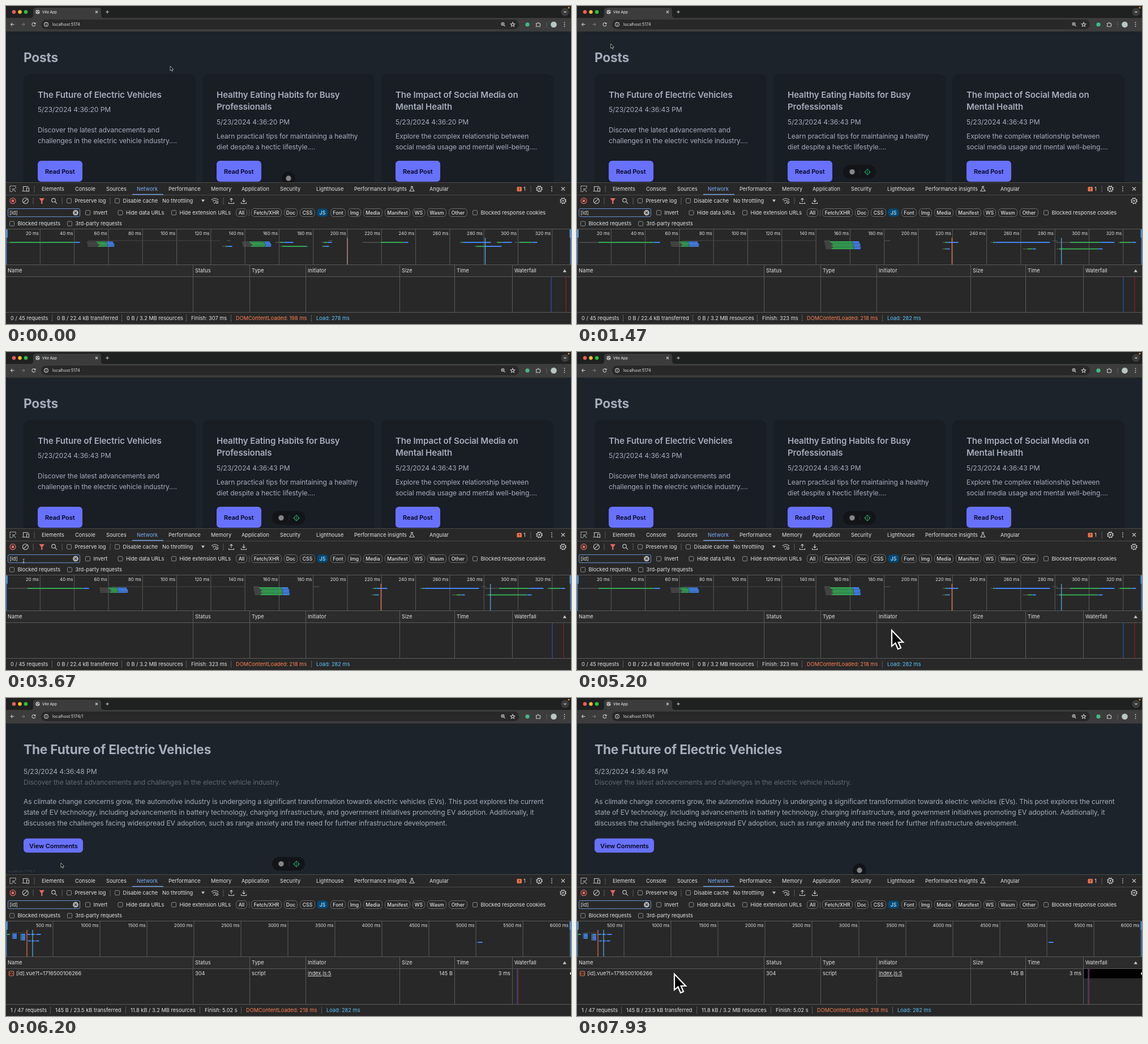
Recreate the animation shown at these times as an HTML page. Size 998x561 px, loop 8 s.

```html
<!DOCTYPE html>
<html lang="en">
<head>
<meta charset="utf-8">
<title>Vite App</title>
<style>
  html, body { margin: 0; width: 100%; height: 100%; overflow: hidden; background: #282828; }
  svg { display: block; width: 100vw; height: 100vh; }
  text { font: 9.2px Inter, "Open Sans", sans-serif; letter-spacing: .003em; fill: #e3e3e3; white-space: pre; }
  .page text { font-size: 12.1px; letter-spacing: -.0072em; fill: #a6adbb; }
  .page .h1 { font-size: 22.7px; font-weight: 700; letter-spacing: -.009em; }
  .page .h2 { font-size: 15.1px; font-weight: 600; letter-spacing: -.008em; }
  .page .btn { font-size: 11px; font-weight: 600; letter-spacing: -.008em; fill: #05061a; }
  .page .dim { fill: #626872; }
  .tick { font-size: 7.8px; text-anchor: end; }
  .chip { font-size: 8.7px; font-weight: 500; text-anchor: middle; }
  .end { text-anchor: end; }
  .line { fill: none; stroke: #c7c7c7; stroke-width: 1.1; }
</style>
</head>
<body>
<svg id="stage" viewBox="0 0 998 561" preserveAspectRatio="none"></svg>
<script>
const LOOP = 8000, RELOAD = 1130, LOADED = 1400, OPENED = 6130;
const GREY = '#5c5c5c', GREEN = '#34a853', BLUE = '#4285f4', EDGE = '#5a5a5a';
const ORANGE = '#f0724a', SKY = '#4db8f0';

const text = (x, y, s, cls = '', fill = '') =>
  `<text x="${x}" y="${y}" class="${cls}"${fill && ` style="fill:${fill}"`}>${s}</text>`;
const rect = (x, y, w, h, fill, rx = 0, extra = '') =>
  `<rect x="${x}" y="${y}" width="${w}" height="${h}" fill="${fill}" rx="${rx}" ${extra}/>`;
const circle = (x, y, r, fill, extra = '') => `<circle cx="${x}" cy="${y}" r="${r}" fill="${fill}" ${extra}/>`;
const icon = (x, y, d, extra = '') => `<path class="line" transform="translate(${x} ${y})" d="${d}" ${extra}/>`;
const vline = (x, y1, y2, c, w = 1) => rect(x - w / 2, y1, w, y2 - y1, c);
const group = (id, body, cls = '') => `<g id="${id}" class="${cls}">${body}</g>`;
const dots = (x, y, c = '#c7c7c7') => [-3.5, 0, 3.5].map(d => circle(x, y + d, .9, c)).join('');
const gear = (x, y) => circle(x, y, 3.9, 'none', 'stroke="#c7c7c7" stroke-width="1.1"') +
  circle(x, y, 5, 'none', 'stroke="#c7c7c7" stroke-width="1.6" stroke-dasharray="2.2 1.73"') +
  circle(x, y, 1.4, '#c7c7c7');
const check = (x, y, label) =>
  rect(x - .5, y - 4, 8, 8, 'none', 1.5, 'stroke="#8a8a8a"') + text(x + 13.5, y + 3.2, label);

function browser() {
  const lights = ['#ff5f57', '#febc2e', '#28c840'];
  return rect(0, 0, 998, 21, '#1f2020') +
    lights.map((c, i) => circle(14 + i * 10.5, 10.5, 3.2, c)).join('') +
    `<path d="M43 21q5 0 5-5V8q0-5 5-5H163q5 0 5 5V16q0 5 5 5Z" fill="#3c3c3c"/>` +
    group('globe', circle(56, 10.5, 3.7, '#c4c7c5') +
      `<path d="M53 9.5l2.5 1.5 1 2.5M55.5 7.5l1 1.8 3 .4" fill="none" stroke="#3c3c3c"/>`) +
    text(64, 12.8, 'Vite App', '" style="font-size:6.3px;font-weight:500') +
    icon(160, 10.5, 'M-2-2L2 2M2-2L-2 2') + icon(179, 10.5, 'M-2.8 0H2.8M0-2.8V2.8') +
    circle(987.5, 10.5, 7, '#3c3c3c') + icon(987.5, 10.5, 'M-2-1L0 1L2-1') +
    circle(994, 3, 1.5, '#f29a2e') +
    rect(0, 21, 998, 24, '#3c3c3c') + rect(62, 24, 844, 17, '#282828', 8.5) +
    group('reloadHover', circle(49, 32.5, 8.5, '#5a5a5a')) +
    icon(11.5, 32.5, 'M3 0H-3M-.3-2.7L-3 0L-.3 2.7') +
    icon(30, 32.5, 'M-3 0H3M.3-2.7L3 0L.3 2.7', 'opacity=".4"') +
    icon(49, 32.5, 'M2.6-1.4A3 3 0 1 0 2.9 .8M2.9-3.2V-1H.7') +
    circle(71, 32.5, 3.4, 'none', 'class="line"') + icon(71, 32.5, 'M0-.5V2M0-2V-1.2') +
    '<text id="url" x="82" y="35.2" style="font-size:7.2px"></text>' +
    circle(877.5, 31.8, 2.5, 'none', 'class="line"') + icon(877.5, 31.8, 'M1.8 1.8L4 4M-1.2 0H1.2M0-1.2V1.2') +
    icon(895, 32.5, 'M0-3.7L1.1-1.1L3.8-.9L1.7 .9L2.4 3.6L0 2.1L-2.4 3.6L-1.7 .9L-3.8-.9L-1.1-1.1Z') +
    circle(921, 32.7, 3.6, '#41b883') +
    icon(940, 32.5, 'M-3.5-2H-1Q0-5 1-2H3.2V0Q5 .8 3.2 1.8V3.8H-3.5V1.8Q-1.8 .8-3.5-.2Z') +
    vline(955, 28, 38, '#5a5a5a') + circle(967.5, 32.7, 5.3, '#b9c7c4') + dots(986.5, 32.5);
}

const posts = [
  [['The Future of Electric Vehicles'],
   ['Discover the latest advancements and', 'challenges in the electric vehicle industry....'], 223],
  [['Healthy Eating Habits for Busy', 'Professionals'],
   ['Learn practical tips for maintaining a healthy', 'diet despite a hectic lifestyle....'], 234],
  [['The Impact of Social Media on', 'Mental Health'],
   ['Explore the complex relationship between', 'social media usage and mental well-being....'], 234]
];

function listPage() {
  return text(31, 99, 'Posts', 'h1') + posts.map(([title, body, y], i) => {
    const x = 56 + i * 316, dateY = 165.3 + title.length * 21.8;
    return rect(x - 25, 120, 304, 220, '#191d24', 12) +
      title.map((s, k) => text(x, 161.5 + k * 21.8, s, 'h2')).join('') +
      text(x, dateY, '', 'date') +
      body.map((s, k) => text(x, y + k * 18.7, s)).join('') +
      rect(x, 273, 79, 37, '#6871fd', 6, i ? '' : 'id="readBtn"') +
      text(x + 13, 296, 'Read Post', 'btn');
  }).join('');
}

function postPage() {
  const body = [
    'As climate change concerns grow, the automotive industry is undergoing a significant transformation towards electric vehicles (EVs). This post explores the current',
    'state of EV technology, including advancements in battery technology, charging infrastructure, and government initiatives promoting EV adoption. Additionally, it',
    'discusses the challenges facing widespread EV adoption, such as range anxiety and the need for further infrastructure development.'
  ];
  return text(31, 99, 'The Future of Electric Vehicles', 'h1') +
    text(31, 134, '5/23/2024 4:36:48 PM') +
    text(31, 153, 'Discover the latest advancements and challenges in the electric vehicle industry.', 'dim') +
    body.map((s, i) => text(31, 187.3 + i * 18.7, s)).join('') +
    rect(31, 247.8, 105, 25, '#6871fd', 6.2) + text(41, 264.6, 'View Comments', 'btn');
}

function badge() {
  return '<rect id="pill" height="24" rx="12" fill="#121418"/>' + circle(0, 0, 4.7, '#858585', 'id="mark"') +
    group('aim', vline(500, 288, 297, '#2c2f34') +
      circle(513, 292.8, 3.8, 'none', 'stroke="#1fa463" stroke-width="1.2"') +
      circle(513, 292.8, 1.1, '#1fa463') +
      `<path d="M513 287v3M513 295.5v3M507.2 292.8h3M515.8 292.8h3" stroke="#1fa463" stroke-width="1.2"/>`);
}

function devtools() {
  const tabs = [[63, 'Elements'], [122, 'Console'], [177, 'Sources'], [231, 'Network'], [287, 'Performance'],
    [362, 'Memory'], [416, 'Application'], [484, 'Security'], [548, 'Lighthouse'],
    [615, 'Performance insights'], [748, 'Angular']];
  const chips = [[406, 20, 'All'], [433, 54, 'Fetch/XHR'], [491, 24, 'Doc'], [519, 27, 'CSS'], [549, 20, 'JS'],
    [573, 27, 'Font'], [604, 23, 'Img'], [631, 34, 'Media'], [669, 45, 'Manifest'], [718, 22, 'WS'],
    [744, 34, 'Wasm'], [782, 33, 'Other']];
  const cols = [[3, 'Name'], [334, 'Status'], [434, 'Type'], [533, 'Initiator'], [699, 'Size'], [796, 'Time'],
    [898, 'Waterfall']];
  const red = '#e46962';
  return rect(0, 311, 998, 250, '#282828') + rect(0, 311, 998, 1, '#4a4a4a') +
    icon(12, 322.5, 'M5-1V-5H-5V5H-1M5 5L0 0M0 4V0H4', 'stroke-dasharray="2.2 .7"') +
    icon(34.5, 322.5, 'M-4 3V-4H5M-6 4H1M2-1.5H6V4.5H2Z') + vline(50, 317, 329, EDGE) +
    tabs.map(([x, s]) => text(x, 325.8, s, '', s === 'Network' ? '#7cacf8' : '')).join('') +
    rect(0, 333, 998, 1, '#4a4a4a') + rect(223, 331.8, 55, 1.3, '#7cacf8') +
    icon(717, 322.5, 'M-2-4.2H2M-1-4V-1L-4 4H4L1-1V-4') +
    rect(902.5, 319, 8.5, 8, ORANGE, 1.5) + rect(906.3, 320.5, 1.2, 3, '#282828') + rect(906.3, 324.3, 1.2, 1.2, '#282828') +
    text(914, 326, '1') + vline(927, 317, 329, EDGE) + gear(942, 322.5) + dots(964, 322.5) +
    icon(984, 322.5, 'M-3-3L3 3M3-3L-3 3') +

    circle(12, 343.7, 5, 'none', `stroke="${red}" stroke-width="1.2"`) + rect(9.8, 341.5, 4.4, 4.4, red, .6) +
    circle(34.3, 343.7, 5, 'none', 'class="line"') + icon(34.3, 343.7, 'M-3.5 3.5L3.5-3.5') +
    vline(48, 338, 350, EDGE) + `<path d="M58.5 339h9.5l-3.6 5v5h-2.3v-5z" fill="${red}"/>` +
    circle(84, 342.7, 3.3, 'none', 'class="line"') + icon(84, 342.7, 'M2.4 2.4L6 6') + vline(99, 338, 350, EDGE) +
    check(108, 343.7, 'Preserve log') + vline(184, 338, 350, EDGE) + check(193, 343.7, 'Disable cache') +
    text(276, 347, 'No throttling') + '<path d="M345 341.5h6l-3 4.5z" fill="#c7c7c7"/>' +
    icon(369, 344, 'M-6-2Q0-7 6-2M-4 .5Q-1-2 2-1M-2 3L0 4.5') + circle(372.5, 346, 2, 'none', 'class="line"') +
    vline(384, 338, 350, EDGE) + icon(398, 343.7, 'M0 2V-4.5M-2.5-2L0-4.5L2.5-2M-4.5 2.5V4.8H4.5V2.5') +
    icon(420, 343.7, 'M0-4.5V2M-2.5-.5L0 2L2.5-.5M-4.5 2.5V4.8H4.5V2.5') + gear(984, 343.7) +

    rect(3.5, 357.5, 127, 14.2, '#282828', 2.5, 'stroke="#6c94d2" stroke-width="1"') + text(6, 368, '[id]') +
    circle(123, 364.7, 4.9, '#b4b4b4') + icon(123, 364.7, 'M-2-2L2 2M2-2L-2 2', 'style="stroke:#282828"') +
    check(141, 364.7, 'Invert') + check(198.5, 364.7, 'Hide data URLs') + check(293, 364.7, 'Hide extension URLs') +
    vline(429.5, 359, 371, EDGE) +
    chips.map(([x, w, s]) => {
      const on = s === 'JS';
      return rect(x + .5, 357.5, w - 1, 14, on ? '#004a77' : 'none', 5, on ? '' : 'stroke="#6a6a6a"') +
        text(x + w / 2, 367.9, s, 'chip', on ? '#c2e7ff' : '');
    }).join('') +
    check(825, 364.7, 'Blocked response cookies') + check(7, 384, 'Blocked requests') +
    check(109, 384, '3rd-party requests') +

    rect(0, 393, 998, 1, EDGE) + rect(0, 456, 998, 1, EDGE) + rect(0, 457, 998, 20, '#2c2c2c') +
    rect(0, 477, 998, 1, EDGE) + rect(0, 540, 998, 1, EDGE) +
    cols.map(([x, s], i) => text(x, 470.2, s) + (i ? vline(x - 3.5, 457, 540, EDGE) : '')).join('') +
    '<path d="M983.5 469.5h6.5l-3.2-5z" fill="#c7c7c7"/>';
}

// One request bar: waiting, download and receive parts laid end to end.
function req(x, y, wait, get, recv) {
  return rect(x, y - .6, wait, 1.2, GREY) + rect(x + wait, y - 1, get, 2, GREEN) +
    rect(x + wait + get + .5, y - 1, recv, 2, BLUE);
}
const stack = (n, x, y, wait, get, recv, jitter = 1) => Array.from({ length: n }, (_, i) => {
  const k = ((i * 7 % 5) - 1) * jitter;
  return req(x + i * .5 * jitter, y + i * 2.4, wait + k, get - k * .6, recv);
}).join('');

function ruler(step, unit, count) {
  let out = '';
  for (let i = 1; i <= count; i++)
    out += vline(i * step, 394, 456, EDGE) + text(i * step - 2.3, 404.3, `${i * unit} ms`, 'tick');
  return out;
}
const marks = (dcl, load, c = ORANGE) => vline(dcl, 409, 456, c, 1.2) + vline(load, 409, 456, SKY, 1.2);
const falls = (a, b) => vline(b, 478, 540, '#8c2320', 1.2) + vline(a, 478, 540, '#304f9e', 1.3);
const summary = (...items) => items.map(([x, s], i) =>
  (i ? vline(x - 8.5, 544.5, 557, EDGE) : '') +
  text(x, 553.8, s, '', s.startsWith('DOM') ? '#ff8154' : s.startsWith('Load') ? '#5cc5ff' : '')).join('');

const states = [
  () => ruler(60.3, 20, 16) + rect(145, 413.5, 233, 1, '#474747') + rect(390, 413.5, 7, 1, GREY) +
    req(2, 417, 5, 112, 11) + stack(4, 143, 416.5, 18, 16, 12) + req(382, 424, 6, 3, 8) +
    stack(4, 417, 416.5, 14, 25, 10) + req(476, 417, 8, 6, 17) + req(484, 424, 4, 42, 2) +
    req(558, 417, 4, 5, 8) + req(558, 424, 2, 3, 7) + rect(570, 413.5, 7, 1, GREY) + req(630, 417, 32, 41, 7) +
    req(801, 417, 4, 3, 48) + req(827, 424, 4, 15, 29) + req(866, 417, 2, 8, 17) + req(899, 417, 8, 22, 9) +
    marks(603, 846.5, '#bd9c8f') + falls(963, 989) +
    summary([8, '0 / 45 requests'], [90, '0 B / 22.4 kB transferred'], [213, '0 B / 3.2 MB resources'],
      [327, 'Finish: 307 ms'], [406, 'DOMContentLoaded: 198 ms'], [548, 'Load: 278 ms']),
  () => ruler(92, 10, 11) + req(2, 417, 115, 308, 0) + vline(947, 478, 540, '#3c3c3c') +
    summary([8, '0 / 1 requests'], [82, '0 B / 145 B transferred'], [196, '0 B / 0 B resources']),
  () => ruler(60.3, 20, 16) + rect(186, 413.5, 235, 1, '#474747') + rect(437, 413.5, 10, 1, GREY) +
    rect(543, 413.5, 10, 1, GREY) + rect(840, 413.5, 8, 1, GREY) +
    req(4, 417, 34, 97, 11) + stack(4, 165, 416.5, 17, 14, 17) + stack(6, 437, 416, 11, 38, 12) +
    req(646, 417, 4, 4, 19) + req(645, 428.5, 5, 3, 5) + req(731, 417, 4, 3, 97) + req(788, 428.5, 8, 8, 6) +
    req(846, 417, 25, 53, 25) + req(847, 428.5, 5, 68, 8) + req(956, 417, 3, 20, 8) +
    marks(662.3, 855.7) + falls(965, 985) +
    summary([8, '0 / 45 requests'], [90, '0 B / 22.4 kB transferred'], [213, '0 B / 3.2 MB resources'],
      [327, 'Finish: 323 ms'], [406, 'DOMContentLoaded: 218 ms'], [548, 'Load: 282 ms']),
  () => ruler(83, 500, 12) + rect(10, 413.5, 25, 1, '#474747') + req(2, 417, 0, 5, 0) +
    stack(4, 10, 416.5, 1, 0, 7.5, 0) + stack(5, 25, 417, 1, 1, 6.5, 0) +
    req(37, 417, 0, 1, 4) + req(43, 417, 1, 0, 6) + req(51, 417, 2, 0, 8) +
    req(38, 428.5, 1, 0, 4) + req(44, 428.5, 1, 0, 5) + req(51, 428.5, 1, 0, 6) +
    req(831, 431, 2, 0, 8) + marks(37, 47) +
    group('rowHover', rect(895.5, 478, 102.5, 16.5, '#000')) + falls(903, 904.6) + rect(996.5, 484, 1.5, 4, '#fff') +
    rect(5.5, 482, 8, 8, 'none', 1.5, `stroke="${ORANGE}" stroke-width="1.2"`) +
    `<path d="M8.6 484.4L7.2 486l1.4 1.6M10.4 484.4l1.4 1.6-1.4 1.6" fill="none" stroke="${ORANGE}" stroke-width=".9"/>` +
    text(18, 489.2, '[id].vue?t=1716500106266') + text(334, 489.2, '304') + text(434, 489.2, 'script') +
    text(533, 489.2, 'index.js:5', '" text-decoration="underline') + text(789, 489.2, '145 B', 'end') +
    text(891, 489.2, '3 ms', 'end') +
    summary([8, '1 / 47 requests'], [87, '145 B / 23.5 kB transferred'], [220, '11.8 kB / 3.2 MB resources'],
      [351, 'Finish: 5.02 s'], [424, 'DOMContentLoaded: 218 ms'], [566, 'Load: 282 ms'])
];

const handles = [0, 996.5].map(x => rect(x, 394, 1.5, 62, '#3f78b5') + rect(x - 1, 394, 4, 15, '#4d90d6', 1.5)).join('');

const beam = 'M-6-14Q0-14 0-9Q0-14 6-14M0-9V9M-6 14Q0 14 0 9Q0 14 6 14M-4 4H4';
const cursors = [
  '<path d="M0 0V28L6.5 22.5L11 33L16 31L11.7 21H20Z" fill="#000" stroke="#fff" stroke-width="2.2"/>',
  `<path d="${beam}" fill="none" stroke="#111" stroke-width="6"/><path d="${beam}" fill="none" stroke="#eee" stroke-width="2.6"/>`,
  '<path d="M-2 0Q1-3 4 0V11L15 13Q18 14 17 20L14 31H1L-9 18Q-8 14-2 18Z" fill="#000" stroke="#fff" stroke-width="2.2"/>'
];

const stage = document.getElementById('stage');
stage.innerHTML = rect(0, 0, 998, 561, '#1d232a') + group('list', listPage(), 'page') + group('post', postPage(), 'page') +
  badge() + group('link', rect(0, 301.5, 54, 10, '#1b2026') + text(3, 308, 'localhost:5174/1', '" style="font-size:6.4px;fill:#7d828a')) +
  browser() + devtools() + states.map((draw, i) => group('state' + i, draw())).join('') + handles +
  group('cursor', cursors.map((c, i) => group('cur' + i, c)).join(''));

const $ = id => document.getElementById(id);
const show = (id, on) => { $(id).style.display = on ? '' : 'none'; };
const dates = [...document.querySelectorAll('.date')];
const clamp = v => Math.min(1, Math.max(0, v));
const ease = v => v * v * (3 - 2 * v);
const mix = (a, b, k) => a + (b - a) * k;

// time, x, y, kind (0 arrow, 1 text beam, 2 hand), enlargement
const path = [
  [0, 290, 106], [230, 290, 106], [1000, 53, 39], [1380, 53, 39], [1700, 87, 180, 1], [1970, 87, 180],
  [2220, 740, 200], [2480, 8, 100], [2780, 196, 218], [2940, 121, 354], [3130, 121, 354, 1], [3530, 31, 369, 1],
  [3700, 31, 369], [4050, 60, 482], [4470, 24, 370], [4700, 380, 480, 0, .3], [4880, 600, 488, 0, 1],
  [5040, 420, 486, 0, 1], [5200, 556, 491, 0, 1], [5330, 556, 491, 0, 1], [5520, 520, 470],
  [5900, 97, 291, 2], [OPENED, 97, 291], [6330, 97, 291], [6750, 120, 487], [7130, 120, 487],
  [7300, 30, 487, 0, .4], [7450, 172, 487, 0, 1], [7600, 50, 488, 0, 1], [7760, 172, 487, 0, 1], [LOOP, 172, 487, 0, 1]
];

function pointer(t) {
  const i = path.findIndex(p => p[0] > t);
  const [t0, x0, y0, kind = 0, s0 = 0] = path[i - 1], [t1, x1, y1, , s1 = 0] = path[i];
  const k = ease((t - t0) / (t1 - t0));
  return { x: mix(x0, x1, k), y: mix(y0, y1, k), size: mix(.28, 1, mix(s0, s1, k)), kind };
}

function render(t) {
  const phase = t < RELOAD ? 0 : t < LOADED ? 1 : t < OPENED ? 2 : 3;
  states.forEach((_, i) => show('state' + i, i === phase));
  show('list', phase < 3);
  show('post', phase === 3);
  show('globe', phase !== 1);
  $('url').textContent = 'localhost:5174' + (phase === 3 ? '/1' : '');
  dates.forEach(d => { d.textContent = `5/23/2024 4:36:${phase < 2 ? 20 : 43} PM`; });

  const open = phase < 2 ? 0 : 1 - ease(clamp((t - 6500) / 300));
  const w = mix(24, 58, open), y = mix(304, 292.6, open);
  const pill = $('pill');
  pill.setAttribute('x', 499 - w / 2);
  pill.setAttribute('y', y - 12);
  pill.setAttribute('width', w);
  $('mark').setAttribute('cx', mix(499, 486, open));
  $('mark').setAttribute('cy', y);
  $('aim').style.opacity = clamp(open * 2 - 1);

  const p = pointer(t);
  $('cursor').setAttribute('transform', `translate(${p.x} ${p.y}) scale(${p.size})`);
  cursors.forEach((_, i) => show('cur' + i, i === p.kind));
  show('reloadHover', Math.hypot(p.x - 49, p.y - 32.5) < 10);
  show('rowHover', p.y > 478 && p.y < 495);
  $('readBtn').setAttribute('fill', p.kind === 2 ? '#5a61e0' : '#6871fd');
  $('link').style.opacity = t < 5900 ? 0 : 1 - clamp((t - OPENED) / 110);
}

function frame(now) {
  render(now % LOOP);
  requestAnimationFrame(frame);
}
render(0);
requestAnimationFrame(frame);
</script>
</body>
</html>
```
